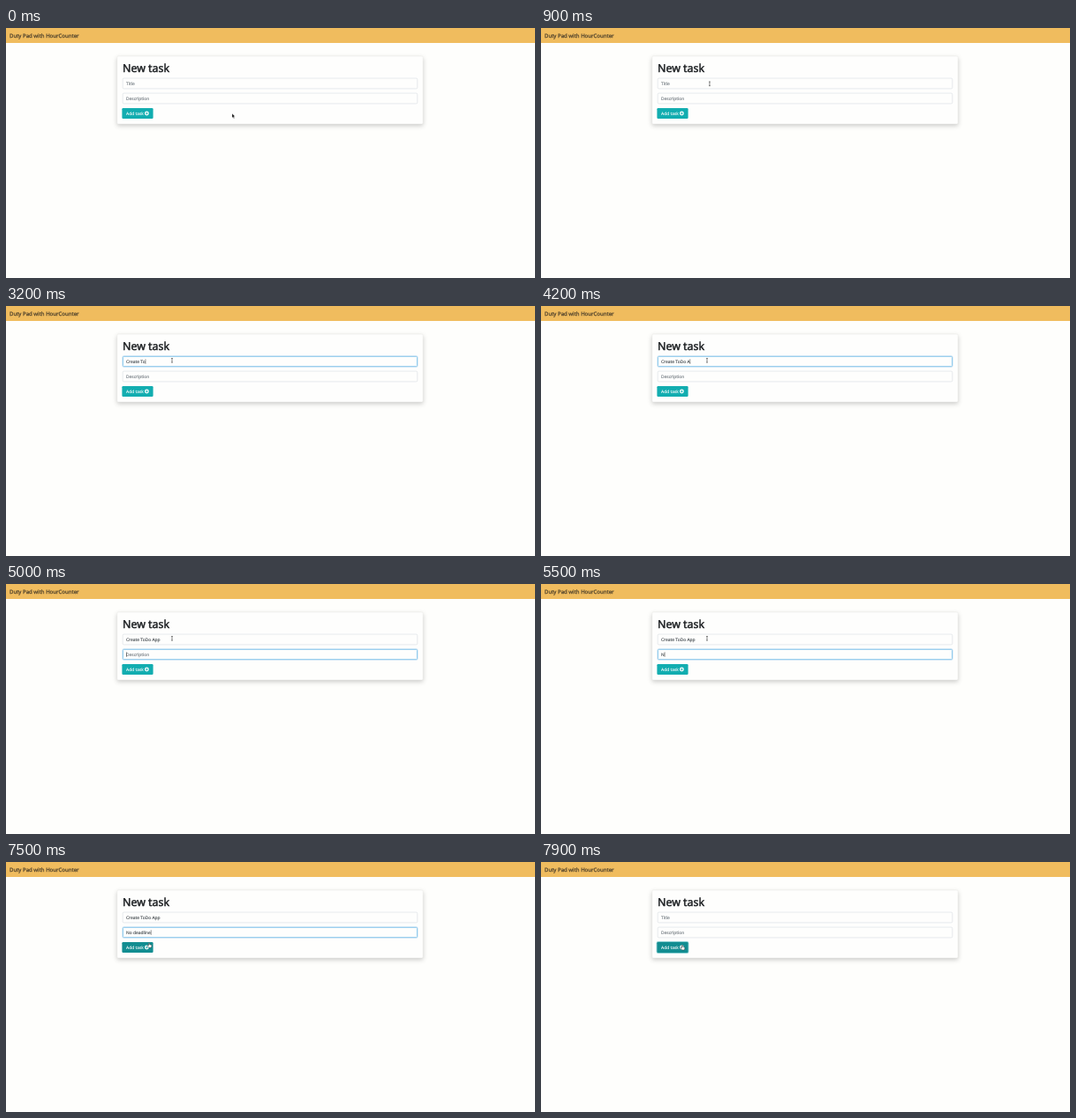
Write an HTML page that moves like this. It is 599 px wide and 284 px high and loops after 8000 ms.

```html
<!DOCTYPE html>
<html lang="en">
<head>
<meta charset="utf-8">
<style>
  html, body { margin: 0; width: 100%; height: 100%; overflow: hidden; background: #fefefc; }
  svg { display: block; }
  text { font: 4.9px "Noto Sans", "Open Sans", sans-serif; text-rendering: geometricPrecision; white-space: pre; stroke-width: .1; }
  .brand { font-size: 6.05px; fill: #4f422c; stroke: #4f422c; stroke-width: .25; }
  .heading { font-size: 12.4px; fill: #1b1e21; stroke: #1b1e21; stroke-width: .45; }
  .card { fill: #fefefd; stroke: #e2e2e0; stroke-width: .4; filter: drop-shadow(0 2px 2.6px rgba(0, 0, 0, .2)); }
  .glow { fill: none; stroke: #7cc3ec; stroke-width: .9; }
  .halo { fill: none; stroke: #7fc3f5; stroke-opacity: .15; stroke-width: 1; }
  .box { fill: #fefefd; stroke: #ced4da; stroke-width: .5; }
</style>
</head>
<body>
<svg width="599" height="284" viewBox="0 0 599 284">
  <rect width="599" height="17" fill="#f0bc5e"/>
  <text class="brand" x="4" y="10.5">Duty Pad with HourCounter</text>
  <rect class="card" x="125.8" y="32" width="346.4" height="77" rx="1.3"/>
  <text class="heading" x="132" y="50.2">New task</text>
  <g id="fields"></g>
  <rect id="ring" x="131.2" y="90.5" width="35.6" height="13" rx="1.8" fill="none" stroke="#17a2a8" stroke-opacity=".5" stroke-width="1.2"/>
  <rect id="button" x="131.4" y="91" width="35.2" height="12" rx="1.2"/>
  <text x="136" y="98.8" fill="#fff" stroke="#fff">Add task</text>
  <circle cx="159.4" cy="97" r="2.4" fill="#fff"/>
  <path d="M158 97h2.8M159.4 95.6v2.8" stroke="#12adb0" stroke-width=".75"/>
  <g id="pointer">
    <path id="arrow" d="M0 0v4.6l1.1-1 .8 1.8.8-.4-.8-1.7h1.5z" fill="#111" stroke="#fff" stroke-width=".3"/>
    <path id="beam" d="M-.9-2.3h1.8M0-2.3v4.6M-.9 2.3h1.8" fill="none" stroke="#333" stroke-width=".6"/>
    <path id="hand" d="M-.6-2.3q.6-.7 1.1 0v1.6l2 .6q.6.3.4 1l-.5 2h-2.7l-1.7-2.2q0-.8.8-.6l.6.5z" fill="#fff" stroke="#222" stroke-width=".45"/>
  </g>
</svg>
<script>
const LOOP = 8000, CLEAR = 7800, PRESS = 7700;
const $ = id => document.getElementById(id);
const clamp = v => Math.max(0, Math.min(1, v));
const ease = v => v * v * (3 - 2 * v);
const mix = (a, b, p) => a + (b - a) * p;
const fade = (t, start) => clamp((t - start + 50) / 150);

function makeField(y, hint, value, keys, on, off) {
  const group = document.createElementNS("http://www.w3.org/2000/svg", "g");
  const rect = (cls, grow) => `<rect class="${cls}" x="${132.2 - grow}" y="${y - grow}" width="${333.6 + 2 * grow}" height="${11.8 + 2 * grow}" rx="1.2"/>`;
  group.innerHTML = rect("box", 0) +
    `<g>${rect("halo", .6)}${rect("glow", -.2)}</g><text x="136" y="${y + 7.7}"></text>` +
    `<rect y="${y + 3.2}" width=".45" height="5.6" fill="#222"/>`;
  $("fields").append(group);
  const [, focus, label, caret] = group.children;

  return t => {
    const count = t < CLEAR ? keys.filter(k => k <= t).length : 0;
    const color = count ? "#3a4046" : "#6c747b";
    label.textContent = count ? value.slice(0, count) : hint;
    label.setAttribute("fill", color);
    label.setAttribute("stroke", color);
    focus.setAttribute("opacity", fade(t, on) * (1 - fade(t, off)));
    caret.setAttribute("opacity", +(t >= on && t < off));
    caret.setAttribute("x", 136.1 + (count ? label.getComputedTextLength() : 0));
  };
}

const fields = [
  makeField(57.1, "Title", "Create ToDo App",
    [1300, 1600, 1700, 1800, 2000, 2100, 2300, 2900, 3200, 3400, 3700, 4000, 4200, 4500, 4600], 1000, 4900),
  makeField(74.1, "Description", "No deadline",
    [5500, 5800, 6000, 6000, 6100, 6200, 6300, 6500, 6600, 6600, 6700], 4900, PRESS)
];

function drawPointer(t) {
  const toField = ease(clamp((t - 200) / 800));
  const toButton = ease(clamp((t - 7000) / 600));
  const x = mix(mix(256, 188, toField), 160, toButton);
  const y = mix(mix(97.3, 61.8, toField), 97, toButton);
  const overField = (y > 57 && y < 69) || (y > 74 && y < 86);
  const overButton = x < 166 && y > 91;
  const shape = overField ? "beam" : overButton ? "hand" : "arrow";
  for (const id of ["arrow", "beam", "hand"]) $(id).setAttribute("visibility", id === shape ? "visible" : "hidden");
  $("pointer").setAttribute("transform", `translate(${x} ${y})`);
  $("button").setAttribute("fill", overButton ? "#128d91" : "#12adb0");
}

function draw(now) {
  const t = Math.floor(now % LOOP / 100) * 100;
  fields.forEach(update => update(t));
  drawPointer(t);
  $("ring").setAttribute("opacity", fade(t, PRESS));
  requestAnimationFrame(draw);
}
draw(performance.now());
</script>
</body>
</html>
```
